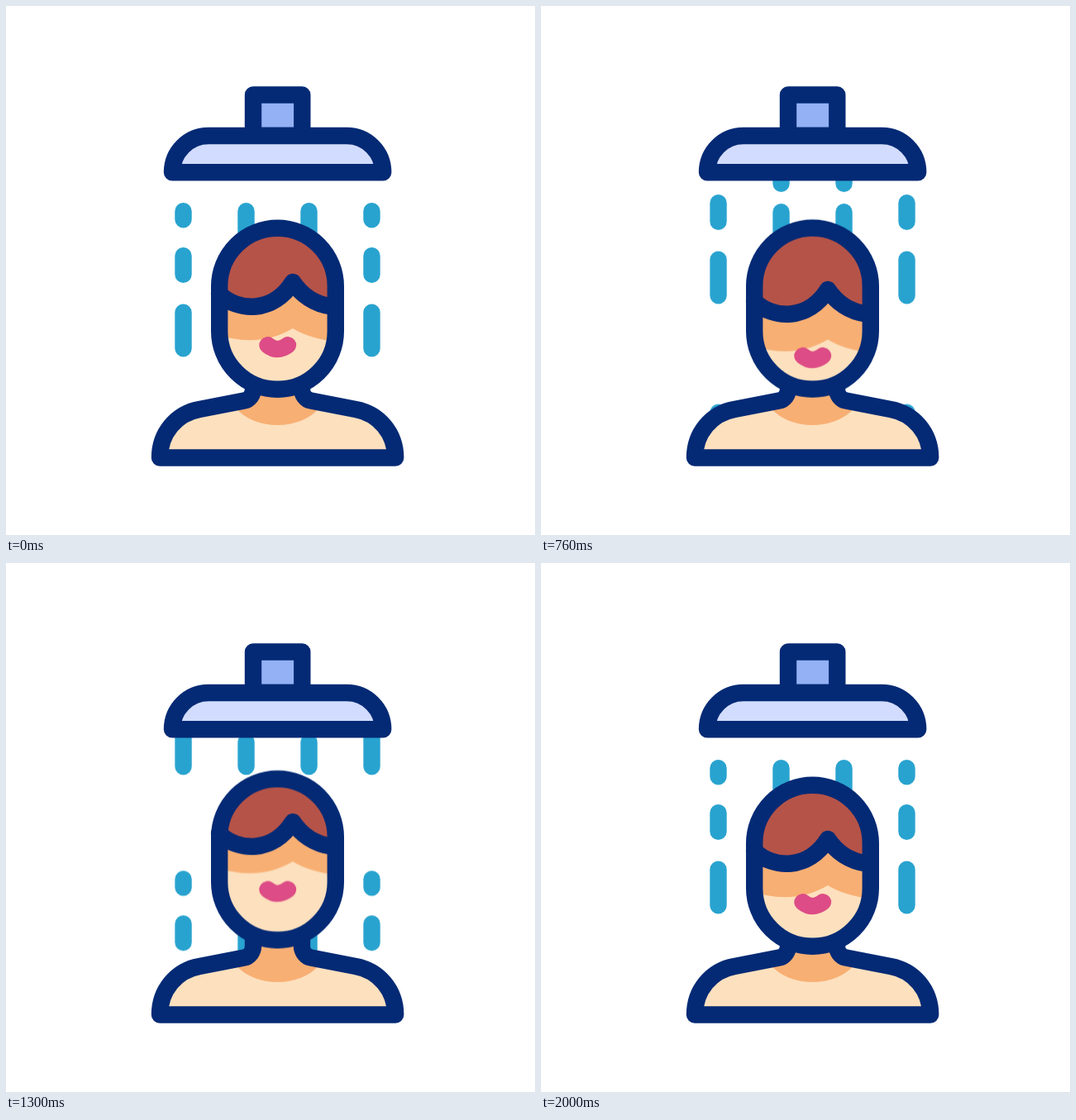
These frames come from a looping animation (640 by 640 pixels, 2.22 s). An HTML page:

```html
<!DOCTYPE html>
<html lang="en">
<head>
<meta charset="utf-8">
<title>Shower</title>
<style>
  html, body { margin: 0; width: 100%; height: 100%; overflow: hidden; background: #fff; }
  svg { display: block; width: 100vw; height: 100vh; }

  .line { stroke: #042a75; stroke-width: 20.4; stroke-linecap: round; stroke-linejoin: round; }
  .drops path { fill: none; stroke: #28a3cf; stroke-width: 20.4; stroke-linecap: round; }
  .skin { fill: #fde0be; }
  .shade { fill: #f8af73; }
  .lips { fill: none; stroke: #dd4c86; stroke-width: 20.4; stroke-linecap: round; }

  /* Nodding: each part swings between --up and --down, two times per loop */
  .bob { animation: bob 2220ms cubic-bezier(.333, 0, .667, 1) infinite; }
  .head { --up: -9px; --down: 0px; }
  .hair { --up: -17.6px; --down: 10px; }
  .mouth { --up: -11.8px; --down: 13.8px; }
  .shadow { --up: -28.2px; --down: 14.8px; }
  @keyframes bob {
    0%, 90.09%, 100% { transform: translateY(0px); }
    18.018%, 54.054% { transform: translateY(var(--up)); }
    36.036%, 72.072% { transform: translateY(var(--down)); }
  }

  /* Three bursts of water: leaving, passing through, arriving */
  .leave { animation: leave 2220ms linear infinite; }
  .pass { animation: pass 2220ms linear infinite; }
  .arrive { animation: arrive 2220ms linear infinite; }
  @keyframes leave {
    0% { transform: translateY(0px); animation-timing-function: cubic-bezier(.333, 0, .667, 1); }
    48.06%, 100% { transform: translateY(304.3px); }
  }
  @keyframes pass {
    0%, 18.018% { transform: translateY(-227.5px); }
    26.126% { transform: translateY(-146.5px); animation-timing-function: cubic-bezier(.333, .342, .667, .711); }
    43.243% { transform: translateY(20px); animation-timing-function: cubic-bezier(.333, .378, .667, .702); }
    58.559% { transform: translateY(134px); }
    77.477%, 100% { transform: translateY(264px); }
  }
  @keyframes arrive {
    0%, 53.153% { transform: translateY(-219px); }
    58.559% { transform: translateY(-168.5px); animation-timing-function: cubic-bezier(.333, .414, .667, .754); }
    75.676% { transform: translateY(-40.4px); animation-timing-function: cubic-bezier(.333, .66, .667, 1); }
    90.09%, 100% { transform: translateY(0px); }
  }
</style>
</head>
<body>
<svg viewBox="0 0 640 640">
  <defs>
    <clipPath id="spray"><rect x="195" y="200" width="266" height="340"/></clipPath>
    <clipPath id="skull"><rect x="258.2" y="268.8" width="140.6" height="194.9" rx="70.3"/></clipPath>
    <path id="outer" d="M0 248.2V258.2M0 302.2V324.8M0 370.7V414.3"/>
    <path id="inner" d="M0 248.2V278.8M0 313.2V352.3M0 384.7V414.3"/>
    <g id="burst">
      <use href="#outer" x="214.5"/>
      <use href="#inner" x="290.5"/>
      <use href="#inner" x="366.5"/>
      <use href="#outer" x="442.5"/>
    </g>
  </defs>

  <g class="drops" clip-path="url(#spray)" fill="none" stroke="#28a3cf" stroke-width="20.4" stroke-linecap="round">
    <g class="leave"><use href="#burst"/></g>
    <g class="pass"><use href="#burst"/></g>
    <g class="arrive"><use href="#burst"/></g>
  </g>

  <g>
    <path class="skin" d="M186 546.5C186 517 206 493 234 488L288 477.6C294.5 476.3 299 470 299 463.5V452H358V463.5C358 470 362.5 476.3 369 477.6L423 488C451 493 471.2 517 471.2 546.5Z"/>
    <path class="shade" d="M278 486C300 514 357 514 379 486L358 465V450H299V465Z"/>
    <path class="line" fill="none" d="M299 452V463.5C299 470 294.5 476.3 288 477.6L234 488C206 493 186 517 186 546.5H471.2C471.2 517 451 493 423 488L369 477.6C362.5 476.3 358 470 358 463.5V452"/>
  </g>

  <g class="head bob">
    <g clip-path="url(#skull)">
      <rect class="skin" x="250" y="260" width="160" height="210"/>
      <path class="shadow bob shade" d="M250 396Q305 415 347 390Q366 402 402 407V310H250Z"/>
      <g class="mouth bob"><path class="lips" d="M316.5 410.3Q328.5 420 341 410.3"/></g>
      <path class="hair bob" fill="#b55348" d="M258 348C281 371 324 371 347 334C357 349 373 361 394 363.5H410V230H240V348Z"/>
    </g>
    <path class="hair bob line" fill="none" d="M258 348C281 371 324 371 347 334C357 349 373 361 394 363.5"/>
    <rect class="line" fill="none" x="258.2" y="268.8" width="140.6" height="194.9" rx="70.3"/>
  </g>

  <g class="line">
    <rect x="299" y="107.5" width="59.3" height="49.5" fill="#93b1f4"/>
    <path fill="#d2dcfe" d="M201 201.3A44 44.3 0 0 1 245 157H412.2A44 44.3 0 0 1 456.2 201.3Z"/>
  </g>
</svg>
</body>
</html>
```
